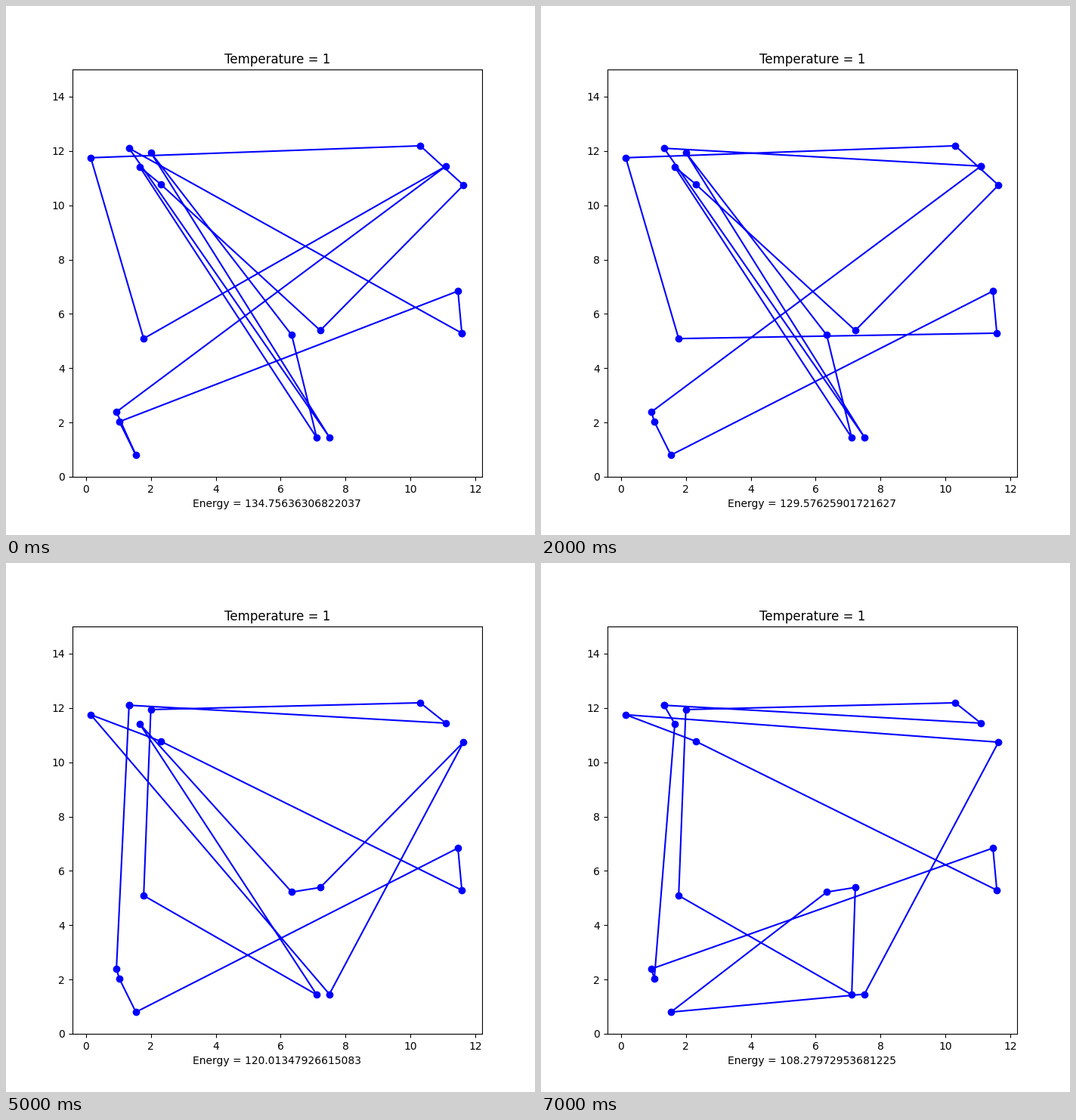
A matplotlib script for the animation above (8000 ms loop, 700 by 700 pixels).

```python
import matplotlib.pyplot as plt
from matplotlib.animation import FuncAnimation

CITIES = {
    "A": (0.15, 11.75), "B": (1.33, 12.10), "C": (2.00, 11.94),
    "D": (1.66, 11.41), "E": (2.31, 10.77), "F": (10.30, 12.19),
    "G": (11.09, 11.44), "H": (11.63, 10.74), "I": (11.46, 6.84),
    "J": (11.58, 5.29), "K": (7.22, 5.39), "L": (6.34, 5.22),
    "M": (1.78, 5.09), "N": (0.94, 2.39), "O": (1.03, 2.03),
    "P": (1.54, 0.80), "Q": (7.11, 1.44), "R": (7.50, 1.46),
}
START = "JIOPNGMAFHKEDQLCRB"
# City pairs exchanged on the way into each step
SWAPS = ["", "IN", "JG", "EM ML", "BG", "FR", "HR", "KP DK ND"]
ENERGIES = [
    "134.75636306822037", "134.10198144971255",
    "129.57625901721627", "127.96612850373146",
    "122.38432967806114", "120.01347926615083",
    "115.9015535583793", "108.27972953681225",
]


def swap(tour, pair):
    a, b = pair
    return tour.translate(str.maketrans(a + b, b + a))


def tour_at(step):
    tour = START
    for group in SWAPS[:step + 1]:
        for pair in group.split():
            tour = swap(tour, pair)
    return tour


def closed_path(tour):
    return zip(*(CITIES[c] for c in tour + tour[0]))


fig, ax = plt.subplots(figsize=(7, 7), dpi=100)
route, = ax.plot(*closed_path(START), "bo-")
ax.set_ylim(0, 15)
ax.set_title("Temperature = 1")


def draw(step):
    xs, ys = closed_path(tour_at(step))
    route.set_data(xs, ys)
    ax.set_xlabel("Energy = " + ENERGIES[step])
    return route,


anim = FuncAnimation(fig, draw, frames=len(SWAPS), interval=1000,
                     init_func=lambda: draw(0), repeat=True, repeat_delay=0)
plt.show()
```
